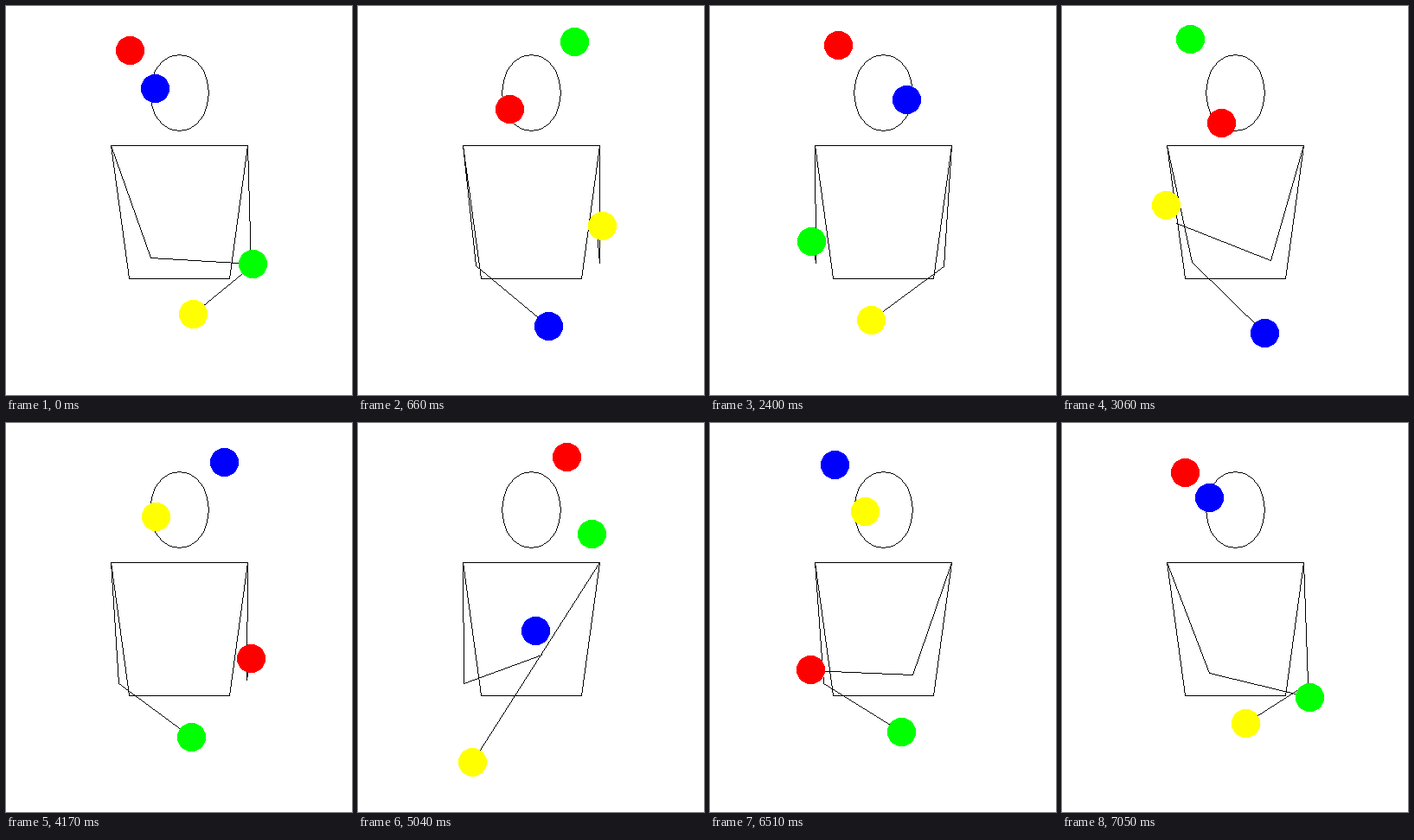
Animation of 400 by 450 pixels, one loop 7.08 s. Source, as an HTML page with a canvas:

```html
<!DOCTYPE html>
<html lang="en">
<head>
<meta charset="utf-8">
<title>Four ball juggler</title>
<style>
html, body { margin: 0; width: 100%; height: 100%; overflow: hidden; background: #fff; }
canvas { display: block; }
</style>
</head>
<body>
<canvas id="stage" width="400" height="450"></canvas>
<script>
const ctx = document.getElementById('stage').getContext('2d');

// Lengths in cm, times in seconds (beats where noted).
const SCALE = 3.415, GRAVITY = 244;
const BEAT = 0.59, FRAME = 30, LOOP = 7080;
const AIR = 2.7 * BEAT, EMPTY = 0.7 * BEAT, HOLD = 1.3 * BEAT;
const LIFT = GRAVITY * AIR / 2;
const ARM = 41, SHOULDER = { x: 23, z: 40 }, REACH = 30;
const COLORS = ['#0f0', '#ff0', '#00f', '#f00'];

// Left hand: three throws, two beats apart; the right hand mirrors it three beats later.
const THROW_X = [25, 25, -25], CATCH_X = [0, 2.5, -2.5];
const throws = THROW_X.map((x, i) => ({ x, z: 0, vx: (CATCH_X[i] - x) / AIR, vz: LIFT }));

const mod = (a, n) => ((a % n) + n) % n;
const mirror = p => ({ x: -p.x, z: p.z });

// The hand meets the ball moving along its path, at the speed that keeps acceleration least.
const catches = throws.map((from, i) => {
  const ball = throws[(i + 2) % 3], to = throws[(i + 1) % 3];
  const x = CATCH_X[(i + 2) % 3];
  const wx = ball.vx, wz = -LIFT;
  const pull = (a, b, c, va, vb) =>
    6 * (b - a) / EMPTY ** 2 + 6 * (c - b) / HOLD ** 2 - 2 * va / EMPTY - 2 * vb / HOLD;
  const k = (wx * pull(from.x, x, to.x, from.vx, to.vx) + wz * pull(0, 0, 0, LIFT, LIFT)) /
    (4 * (1 / EMPTY + 1 / HOLD) * (wx * wx + wz * wz));
  return { x, z: 0, vx: k * wx, vz: k * wz };
});

function hermite(a, b, va, vb, h, u) {
  const r = 1 - u;
  return a + (b - a) * u * u * (3 - 2 * u) + h * u * r * (va * r - vb * u);
}

function glide(a, b, h, t) {
  const u = t / h;
  return {
    x: hermite(a.x, b.x, a.vx, b.vx, h, u),
    z: hermite(a.z, b.z, a.vz, b.vz, h, u)
  };
}

function leftHand(beat) {
  const b = mod(beat, 6), i = Math.floor(b / 2), t = (b - 2 * i) * BEAT;
  return t < EMPTY
    ? glide(throws[i], catches[i], EMPTY, t)
    : glide(catches[i], throws[(i + 1) % 3], HOLD, t - EMPTY);
}

const rightHand = beat => mirror(leftHand(beat + 3));

function ballAt(i, beat) {
  const age = mod(beat - i, 4), start = Math.round(beat - age);
  const odd = mod(start, 2) === 1;
  if (age >= 2.7) return odd ? rightHand(beat) : leftHand(beat);
  const from = throws[mod(odd ? start + 3 : start, 6) / 2], t = age * BEAT;
  const p = { x: from.x + from.vx * t, z: LIFT * t - GRAVITY * t * t / 2 };
  return odd ? mirror(p) : p;
}

// Elbow hangs straight below the shoulder-hand line; none when the arm is stretched.
function elbow(hand, side) {
  const dx = hand.x - side * SHOULDER.x, dz = hand.z - SHOULDER.z;
  const d = Math.hypot(dx, REACH, dz);
  if (d > 2 * ARM) return null;
  const drop = Math.sqrt(ARM * ARM - d * d / 4), sin = dz / d, cos = Math.sqrt(1 - sin * sin);
  const f = 1 + drop * (sin / cos) / (d / 2);
  return { x: side * SHOULDER.x + dx / 2 * f, z: SHOULDER.z + dz / 2 - drop * cos };
}

const pixel = p => [Math.floor(200.5 + SCALE * p.x), Math.floor(298.5 - SCALE * p.z)];

// Crisp one pixel lines through a list of points.
function path(points) {
  ctx.fillStyle = '#000';
  const list = points.map(pixel);
  for (let i = 1; i < list.length; i++) {
    const [x0, y0] = list[i - 1], [x1, y1] = list[i];
    const n = Math.max(Math.abs(x1 - x0), Math.abs(y1 - y0), 1);
    for (let s = 0; s <= n; s++) {
      ctx.fillRect(Math.round(x0 + (x1 - x0) * s / n), Math.round(y0 + (y1 - y0) * s / n), 1, 1);
    }
  }
}

function disc(p, color) {
  const [x, y] = pixel(p);
  ctx.fillStyle = color;
  for (let dy = -16; dy <= 16; dy++) {
    const w = Math.floor(Math.sqrt(16.5 ** 2 - dy * dy));
    ctx.fillRect(x - w, y + dy, 2 * w + 1, 1);
  }
}

function arm(hand, side) {
  const shoulder = { x: side * SHOULDER.x, z: SHOULDER.z };
  path([shoulder, elbow(hand, side), hand].filter(Boolean));
}

const head = Array.from({ length: 21 }, (_, i) => {
  const a = i * Math.PI / 10;
  return { x: 10 * Math.cos(a), z: 58 + 13 * Math.sin(a) };
});
const body = [[-23, 40], [23, 40], [17, -5], [-17, -5], [-23, 40]].map(([x, z]) => ({ x, z }));

function draw(ms) {
  const beat = Math.floor(ms % LOOP / FRAME) * FRAME / 1000 / BEAT;
  ctx.fillStyle = '#fff';
  ctx.fillRect(0, 0, 400, 450);
  path(head);
  path(body);
  arm(leftHand(beat), -1);
  arm(rightHand(beat), 1);
  COLORS.forEach((color, i) => disc(ballAt(i, beat), color));
}

let begin;
function tick(now) {
  begin ??= now;
  draw(now - begin);
  requestAnimationFrame(tick);
}
draw(0);
requestAnimationFrame(tick);
</script>
</body>
</html>
```
